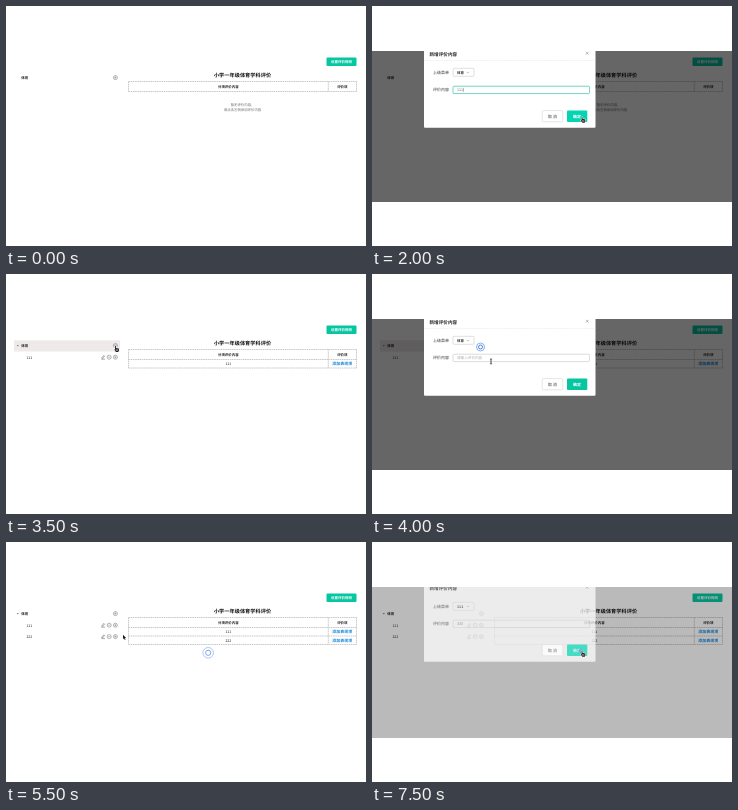
Recreate the animation shown at these times as an HTML page with a canvas. Size 360 by 240 pixels, loop 8000 ms.

```html
<!DOCTYPE html>
<html lang="zh-CN">
<head>
<meta charset="utf-8">
<style>
html, body { margin: 0; width: 100%; height: 100%; overflow: hidden; background: #fff; }
canvas { display: block; width: 360px; height: 240px; }
</style>
</head>
<body>
<canvas width="360" height="240"></canvas>
<script>
const canvas = document.querySelector('canvas');
const c = canvas.getContext('2d');
const ratio = window.devicePixelRatio || 1;
canvas.width = 360 * ratio;
canvas.height = 240 * ratio;

const TEAL = '#06c6a2', BLUE = '#1687dc', LINE = '#c4c4c4', STEP = 500, LOOP = 8000;

// Small type is set ten times larger and scaled down, which avoids hinting.
function text(str, x, y, size, color = '#333', weight = 400, align = 'left') {
  c.save();
  c.translate(x, y);
  c.scale(0.1, 0.1);
  c.font = `${weight} ${size * 10}px "Noto Sans CJK SC", "Noto Sans CJK", sans-serif`;
  c.textRendering = 'geometricPrecision';
  c.textAlign = align;
  c.textBaseline = 'middle';
  c.fillStyle = color;
  c.fillText(str, 0, 0);
  c.restore();
}

function box(x, y, w, h, r, fill, stroke) {
  c.beginPath();
  c.roundRect(x, y, w, h, r);
  if (fill) { c.fillStyle = fill; c.fill(); }
  if (stroke) { c.strokeStyle = stroke; c.lineWidth = 0.6; c.stroke(); }
}

function path(points, color, width = 0.6, dash = []) {
  c.beginPath();
  points.forEach(([x, y]) => c.lineTo(x, y));
  c.setLineDash(dash);
  c.strokeStyle = color;
  c.lineWidth = width;
  c.stroke();
  c.setLineDash([]);
}

function ring(x, y, r, color, width = 0.6) {
  c.beginPath();
  c.arc(x, y, r, 0, 7);
  c.strokeStyle = color;
  c.lineWidth = width;
  c.stroke();
}

function circleIcon(x, y, plus) {
  ring(x, y, 2, '#666', 0.5);
  path([[x - 1.1, y], [x + 1.1, y]], '#666', 0.4);
  if (plus) path([[x, y - 1.1], [x, y + 1.1]], '#666', 0.4);
}

function pen(x, y) {
  path([[x - 1.4, y + 1], [x + 0.8, y - 1.8], [x + 1.6, y - 1], [x - 0.6, y + 1.4], [x - 1.4, y + 1]], '#555', 0.5);
  path([[x - 1.6, y + 2], [x + 2, y + 2]], '#555', 0.5);
}

function page(rows, hover) {
  c.fillStyle = '#fff';
  c.fillRect(0, 0, 360, 240);
  box(320.5, 51.5, 30, 8.5, 1, TEAL);
  text('设置评价规则', 335.5, 55.7, 3.5, '#fff', 700, 'center');

  if (hover !== undefined) {
    c.fillStyle = '#eeeaea';
    c.fillRect(8, 66.3 + hover * 11.5, 106, 11.2);
  }
  if (rows.length) {
    c.fillStyle = '#888';
    c.beginPath();
    c.moveTo(10.6, 71); c.lineTo(13, 71); c.lineTo(11.8, 72.6);
    c.fill();
  }
  text('体育', 15.2, 71.7, 3.5, '#222', 700);
  circleIcon(109.4, 71.6, true);

  text('小学一年级体育学科评价', 236.5, 69, 5.2, '#111', 700, 'center');
  text('分项评价内容', 222.3, 80.4, 3.45, '#222', 700, 'center');
  text('评价项', 336.3, 80.4, 3.45, '#222', 700, 'center');
  const bottom = 85.5 + rows.length * 8.5;
  path([[122.5, 75.5], [350.5, 75.5]], LINE, 0.9, [1.6, 0.6]);
  for (let y = 85.5; y <= bottom; y += 8.5) path([[122.5, y], [350.5, y]], LINE, 0.9, [1.6, 0.6]);
  for (const x of [122.5, 322.3, 350.5]) path([[x, 75.5], [x, bottom]], LINE, 0.9, [1.6, 0.6]);

  rows.forEach((name, i) => {
    const y = 83.2 + i * 11.4, ty = 89.7 + i * 8.6;
    text(name, 20.4, y, 3.5, '#222', 500);
    pen(97, y);
    circleIcon(103.2, y, false);
    circleIcon(109.4, y, true);
    text(name, 222.3, ty, 3.5, '#222', 500, 'center');
    text('添加表现项', 336.3, ty, 4, BLUE, 900, 'center');
  });
  if (!rows.length) {
    text('暂无评价内容,', 235.3, 99, 3.4, '#666', 500, 'center');
    text('请点击左侧添加评价内容', 236.5, 103.7, 3.4, '#666', 500, 'center');
  }
}

function dialog({ parent, value = '', focus, hot, alpha = 1, shade = 0.6, dy = 0 }) {
  c.save();
  c.beginPath();
  c.rect(0, 45, 360, 151);
  c.clip();
  c.fillStyle = `rgba(0,0,0,${shade})`;
  c.fillRect(0, 45, 360, 151);
  c.globalAlpha = alpha;
  c.translate(0, dy);
  box(52, 38, 171.5, 83.7, 1, '#fff');
  text('新增评价内容', 57.5, 48, 4.6, '#222', 700);
  path([[213.8, 45.8], [216.6, 48.6]], '#777', 0.5);
  path([[216.6, 45.8], [213.8, 48.6]], '#777', 0.5);
  path([[52, 54.5], [223.5, 54.5]], '#e6e6e6', 0.6, [1.5, 1]);
  text('上级菜单', 61, 66.2, 4, '#333', 500);
  box(81, 62.3, 21, 8, 1, null, '#ccc');
  text(parent, 85, 66.2, 3.5, '#333', 700);
  path([[94.5, 65.8], [95.8, 67.1], [97.1, 65.8]], '#888', 0.5);
  text('评价内容', 61, 83.7, 4, '#333', 500);
  box(81, 80.2, 136.5, 7.4, 1, null, focus ? '#19b79d' : '#c4c4c4');
  text(value || '请输入评价内容', 85, 83.9, 3.6, value ? '#666' : '#aaa');
  if (focus) {
    const x = 85.5 + value.length * 2;
    path([[x, 81.9], [x, 85.9]], '#555', 0.4);
  }
  box(170.2, 104.6, 20.6, 11.2, 1, '#fff', '#d4d4d4');
  text('取 消', 180.5, 110.1, 4, '#333', 500, 'center');
  box(195, 104.4, 20.3, 11.6, 1, hot ? '#05d4b3' : TEAL);
  text('确定', 205.1, 110.1, 4, '#fff', 700, 'center');
  c.restore();
}

function shape(x, y, points) {
  c.beginPath();
  points.forEach(([px, py]) => c.lineTo(x + px, y + py));
  c.closePath();
  c.lineJoin = 'round';
  c.strokeStyle = '#fff';
  c.lineWidth = 1;
  c.stroke();
  c.fillStyle = '#222';
  c.fill();
}

const pointers = {
  arrow: (x, y) => shape(x, y, [[0, 0], [0, 4.4], [1, 3.5], [1.8, 5.2], [2.6, 4.8], [1.9, 3.2], [3.1, 3.1]]),
  hand: (x, y) => {
    shape(x, y, [[0, 0], [0.9, 0], [1, 2], [3.8, 2.6], [4, 4.4], [3.2, 6], [0.9, 6], [-0.9, 3.6], [0, 3.4]]);
    path([[x + 1.2, y + 3.3], [x + 1.3, y + 4.9]], '#fff', 0.6);
    path([[x + 2.4, y + 3.5], [x + 2.4, y + 4.9]], '#fff', 0.6);
  },
  beam: (x, y) => {
    path([[x, y - 2.4], [x, y + 2.4]], '#222', 0.8);
    path([[x - 1.1, y - 2.4], [x + 1.1, y - 2.4]], '#222', 0.6);
    path([[x - 1.1, y + 2.4], [x + 1.1, y + 2.4]], '#222', 0.6);
  }
};

function ripple(x, y, inner, outer, fade) {
  c.globalAlpha = fade;
  c.beginPath();
  c.arc(x, y, outer, 0, 7);
  c.fillStyle = 'rgba(255,255,255,.6)';
  c.fill();
  ring(x, y, outer, '#5b8fe8', 0.7);
  ring(x, y, inner, '#3f74dc', 0.9);
  c.globalAlpha = 1;
}

const one = ['111'], two = ['111', '222'];
const ghost = { alpha: 0.07, shade: 0, dy: -5.5, value: '111' };
const sport = more => ({ parent: '体育', ...more });
const child = more => ({ parent: '111', ...more });

// One entry per half second.
const scenes = [
  { rows: [] },
  { rows: [], hover: 0, dialog: sport(), click: [108.5, 73, 2, 4, 1], at: ['beam', 119, 87] },
  { rows: [], dialog: sport({ focus: true }), at: ['beam', 119, 85] },
  { rows: [], dialog: sport({ focus: true, value: '1' }), at: ['beam', 119, 85] },
  { rows: [], dialog: sport({ focus: true, value: '111', hot: true }), at: ['hand', 209.5, 110.8] },
  { rows: one, dialog: sport(ghost), click: [208.7, 110.7, 2.3, 4.8, 0.9], at: ['arrow', 196, 116.5] },
  { rows: one, at: ['arrow', 118, 86] },
  { rows: one, hover: 0, at: ['hand', 109, 72] },
  { rows: one, hover: 0, dialog: sport(), click: [108.5, 73, 2, 4, 1], at: ['beam', 119, 87.4] },
  { rows: one, dialog: sport({ focus: true, value: '2' }), at: ['beam', 119, 85] },
  { rows: one, dialog: sport({ focus: true, value: '222', hot: true }), at: ['hand', 202, 111] },
  { rows: two, click: [202.2, 110.8, 2.6, 5.3, 0.7], at: ['arrow', 117, 92.8] },
  { rows: two, hover: 1, at: ['hand', 109, 83.5] },
  { rows: two, hover: 1, dialog: child(), click: [108.5, 84, 2, 8, 0.5], at: ['beam', 100.8, 84.6] },
  { rows: two, dialog: child({ focus: true, value: '333', hot: true }), at: ['hand', 209, 110] },
  { rows: two, dialog: child({ value: '333', hot: true, alpha: 0.72, shade: 0.27, dy: -2 }),
    click: [208.6, 109, 1, 1.6, 0.8], at: ['hand', 209.5, 108.8] }
];

function draw(now) {
  const s = scenes[Math.floor(now % LOOP / STEP)];
  c.setTransform(ratio, 0, 0, ratio, 0, 0);
  page(s.rows, s.hover);
  if (s.dialog) dialog(s.dialog);
  if (s.click) ripple(...s.click);
  if (s.at) pointers[s.at[0]](s.at[1], s.at[2]);
}

const start = performance.now();
function tick() {
  draw(performance.now() - start);
  requestAnimationFrame(tick);
}
tick();
</script>
</body>
</html>
```
